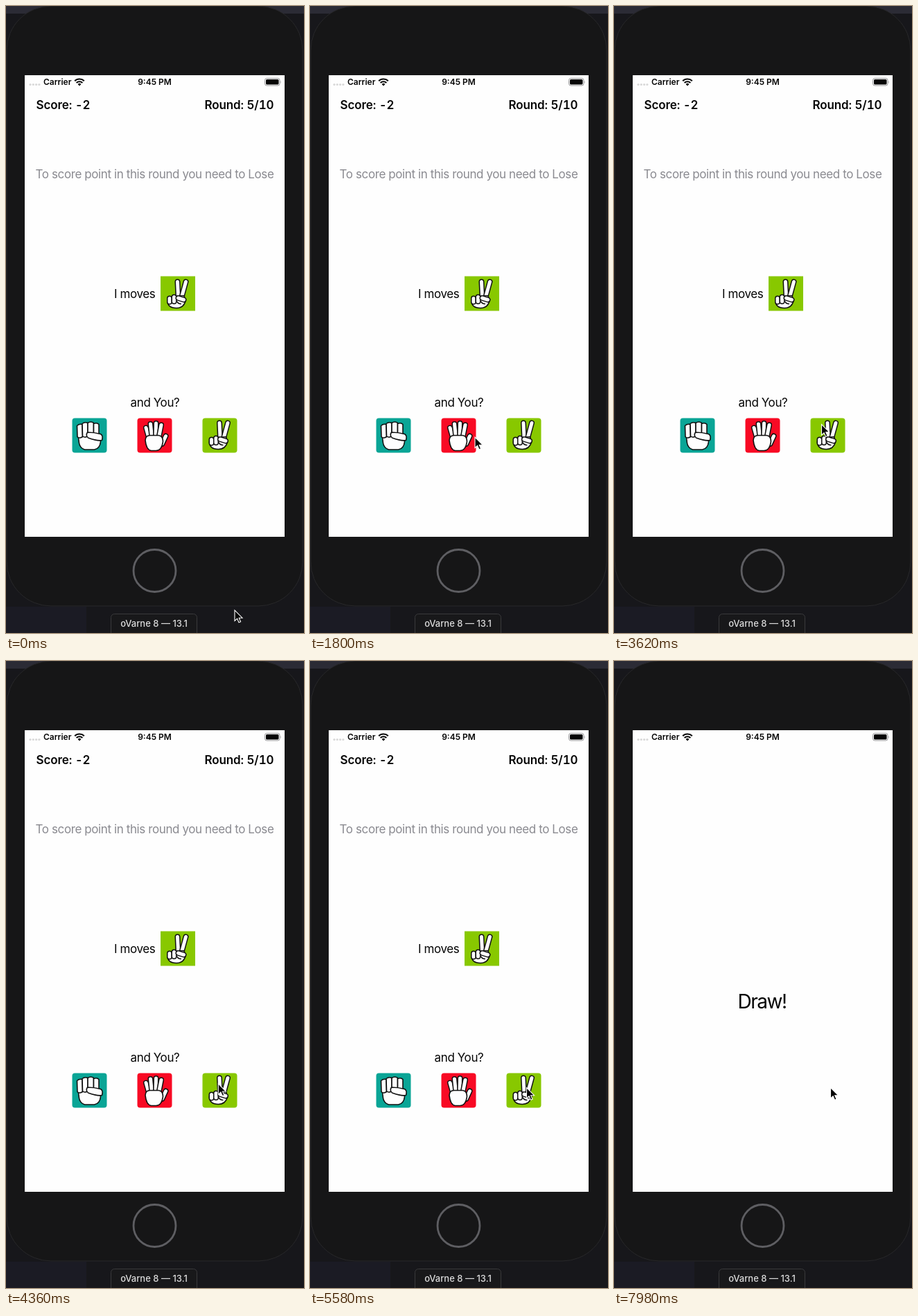
Recreate the animation shown at these times as an HTML page. Size 430 by 906 pixels, loop 8000 ms.

```html
<!DOCTYPE html>
<html lang="en">
<head>
<meta charset="utf-8">
<title>Rock, paper, scissors</title>
<style>
  html, body { margin: 0; width: 100%; height: 100%; overflow: hidden; background: #17171b; }
  svg { display: block; width: 430px; height: 906px; }
  text { font: 17px Inter, "Open Sans", sans-serif; letter-spacing: -.4px; fill: #050505; }
  .middle { text-anchor: middle; }
  .bold { font-weight: 600; letter-spacing: -.1px; font-variant-numeric: tabular-nums; }
  .status { font-size: 12px; font-weight: 600; letter-spacing: 0; }
  .device { font-size: 13px; font-weight: 500; letter-spacing: 0; fill: #dcdcdc; }
  .hint { fill: #8a8a90; }
  .result { font-size: 28px; letter-spacing: -1.5px; }
  .hand path { fill: #fefefe; stroke: #101010; stroke-width: 1.6; stroke-linejoin: round; }
  .hand .edge, .hand .skin { fill: none; stroke-linecap: round; }
  .hand .edge { stroke-width: 8; }
  .hand .skin { stroke: #fefefe; stroke-width: 5; }
</style>
</head>
<body>
<svg viewBox="0 0 430 906">
  <defs>
    <g id="rock" class="hand"></g>
    <g id="paper" class="hand"></g>
    <g id="scissors" class="hand"></g>
  </defs>

  <rect width="430" height="906" fill="#17171b"/>
  <rect width="430" height="11" fill="#2b2b35"/>
  <rect y="868" width="116" height="38" fill="#1b1b24"/>
  <rect x="1" y="0" width="427" height="867" rx="64" fill="#161617" stroke="#28282a"/>
  <rect x="27" y="100" width="375" height="667" fill="#fefefe"/>
  <circle cx="214.5" cy="816" r="30.5" fill="none" stroke="#5e5e62" stroke-width="2.8"/>
  <rect x="151.5" y="878.5" width="124" height="34" rx="5" fill="#18181a" stroke="#3a3a3c"/>
  <text class="device middle" x="213.5" y="897">oVarne 8 — 13.1</text>

  <g fill="#d8d8d8">
    <circle cx="35" cy="113.5" r="1.6"/><circle cx="39.3" cy="113.5" r="1.6"/>
    <circle cx="43.6" cy="113.5" r="1.6"/><circle cx="47.9" cy="113.5" r="1.6"/>
  </g>
  <text class="status" x="54" y="114">Carrier</text>
  <g fill="none" stroke="#050505" stroke-width="2.2">
    <path d="M99.2 108.3A9.7 9.7 0 0 1 112.8 108.3"/>
    <path d="M101.7 111A6.1 6.1 0 0 1 110.3 111"/>
  </g>
  <path d="M106 115.5L103.6 113A3.4 3.4 0 0 1 108.4 113Z"/>
  <text class="status middle" x="214.5" y="114">9:45 PM</text>
  <rect x="373.5" y="104.5" width="21.5" height="10.5" rx="2.8" fill="none" stroke="#98989a"/>
  <rect x="375" y="106" width="18.5" height="7.5" rx="1.5" fill="#050505"/>
  <path d="M396.3 108V111.8Q397.8 110 396.3 108Z" fill="#98989a"/>

  <g id="game">
    <text class="bold" x="43.5" y="148.5">Score: -2</text>
    <text class="bold" x="386.5" y="148.5" text-anchor="end">Round: 5/10</text>
    <text class="hint middle" x="214.5" y="248.5">To score point in this round you need to Lose</text>
    <text x="156" y="422">I moves</text>
    <g transform="translate(223 390.5)">
      <rect width="50" height="50" fill="#88c800"/><use href="#scissors"/>
    </g>
    <text class="middle" x="215" y="579">and You?</text>
    <g transform="translate(95.5 595.5)">
      <rect width="50" height="50" rx="4" fill="#0aa596"/><use href="#rock"/>
    </g>
    <g transform="translate(189.5 595.5)">
      <rect width="50" height="50" rx="4" fill="#f80a24"/><use href="#paper"/>
    </g>
    <g transform="translate(283.5 595.5)">
      <rect width="50" height="50" rx="4" fill="#88c800"/><use href="#scissors" y="-1"/>
    </g>
  </g>
  <text id="result" class="result middle" x="213.5" y="502">Draw!</text>

  <path id="cursor" d="M0 0V15.5L3.6 12.2L6 17.8L8.6 16.7L6.2 11.2H11Z"
        fill="#030303" stroke="#fefefe" stroke-width="1.1"/>
</svg>
<script>
const $ = id => document.getElementById(id);
const shape = d => `<path d="${d}"/>`;
const finger = d => `<path class="edge" d="${d}"/><path class="skin" d="${d}"/>`;

$("scissors").innerHTML =
  finger("M24.5 8L25.5 29") + finger("M36.5 8L30.5 30") +
  shape("M10 35Q10 46 23 46Q33 46 36 36L34 28L18 29Z") +
  finger("M13 32V37") + finger("M19.5 30V36.5") +
  finger("M25.5 31.5L33.5 34") + shape("M23.5 36Q25 40 30 40");

$("paper").innerHTML =
  finger("M12.5 14L17 30") + finger("M19 8.5L21 28") + finger("M27 7.5L26.5 28") +
  finger("M34.5 10L31 28") + finger("M41 26L36 37") +
  shape("M11.5 32Q12 25 18 25H31Q37 26 37 34Q35 47 27 47H20Q13 46 11.5 32Z");

$("rock").innerHTML =
  shape("M8.5 24H40L41 34Q40 44 32 45.5H18Q11 43 10 36Z") +
  shape("M7 11Q10 8 14.5 9L15 27Q10 30 7.5 27Z") +
  shape("M14.5 8Q18 5 22.5 7V26Q18 29 15 26Z") +
  shape("M22.5 7Q27 4 31 7V25H22.5Z") +
  shape("M31 8Q36 6 38.5 9V25H31Z") +
  shape("M22 20.5Q32 20.5 41 23Q45 25 43 32Q37 33.5 23 28.5Q19 25 22 20.5Z");

const LOOP = 8000, RESULT_AT = 5600;
// Time, x and y of the pointer tip
const pointer = [
  [0, 330, 873], [1400, 238, 623], [2000, 238, 623], [2700, 231.5, 611.5],
  [3050, 231.5, 611.5], [3600, 299.5, 604.5], [4000, 299.5, 604.5], [4700, 312.5, 616.5], [LOOP, 312.5, 616.5]
];

function pointerAt(t) {
  const i = pointer.findIndex(key => key[0] > t);
  const [t0, x0, y0] = pointer[i - 1], [t1, x1, y1] = pointer[i];
  const p = (t - t0) / (t1 - t0), eased = p * p * (3 - 2 * p);
  return [x0 + (x1 - x0) * eased, y0 + (y1 - y0) * eased];
}

function draw() {
  const t = performance.now() % LOOP, finished = t >= RESULT_AT;
  $("game").style.display = finished ? "none" : "";
  $("result").style.display = finished ? "" : "none";
  $("cursor").setAttribute("transform", `translate(${pointerAt(t)})`);
  requestAnimationFrame(draw);
}
draw();
</script>
</body>
</html>
```
